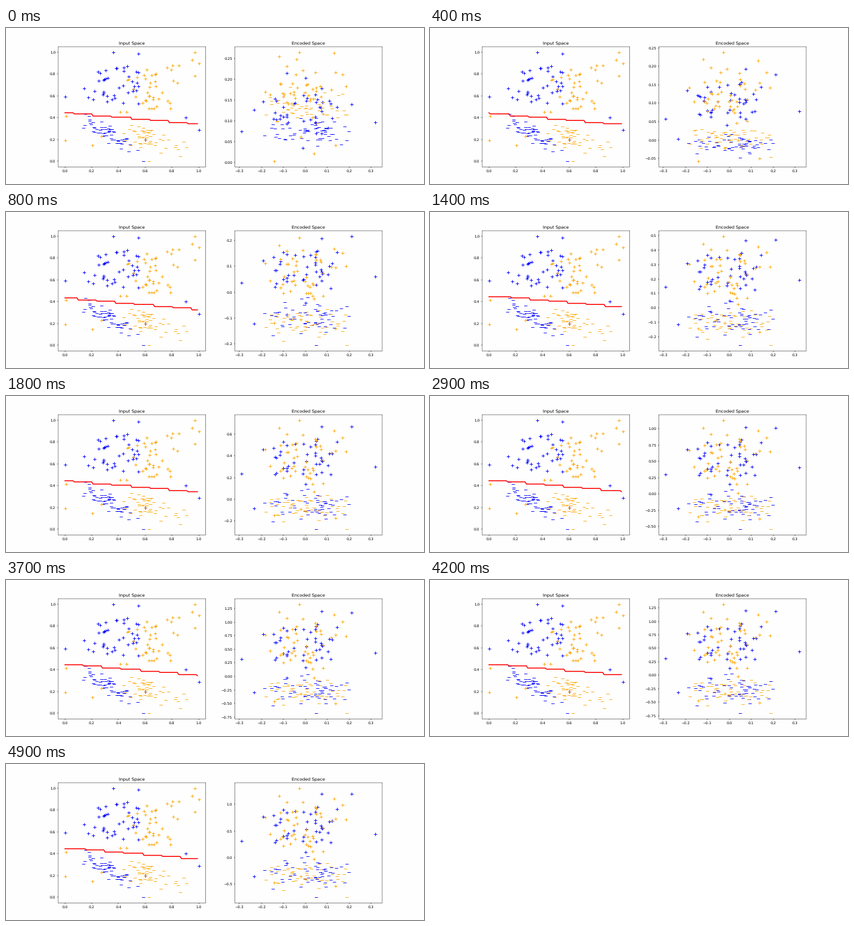
A matplotlib script for the animation above (5000 ms loop, 600 by 225 pixels).

```python
import numpy as np
import matplotlib.pyplot as plt
from matplotlib.animation import FuncAnimation

FRAMES, INTERVAL = 50, 100
PAPER = "#fefefe"
rng = np.random.default_rng(12)
plt.rcParams.update({"text.hinting": "none", "path.snap": False,
                     "figure.facecolor": PAPER, "axes.facecolor": PAPER})


def cluster(count, x_range, y_range, slope=0, outliers=()):
    """Samples (x, y, hidden z): bounded random cloud plus fixed outliers."""
    x = rng.triangular(*x_range, count)
    y = rng.triangular(*y_range, count) + slope * x
    z = rng.triangular(-.22, 0, .22, count)
    return np.vstack([np.column_stack([x, y, z]), *outliers])


GROUPS = [
    (cluster(38, (.12, .42, .62), (.44, .62, .95), outliers=[
        (0, .59, -.01), (.36, 1, .21), (.55, .985, .073), (1, .29, -.085),
        (.9, .4, 0), (.6, .2, -.235), (.21, .57, -.29), (.29, .625, .32)]),
     "blue", "+"),
    (cluster(59, (.12, .36, .56), (.37, .46, .55), slope=-.65, outliers=[
        (.585, .002, .05)]),
     "blue", "_"),
    (cluster(40, (.4, .66, .9), (.36, .6, .97), outliers=[
        (0, .193, -.143), (.007, .418, .038), (.207, .146, .138),
        (.275, .228, -.02), (.97, 1, -.027), (1, .898, .13),
        (.949, .93, -.12), (.97, .784, -.04)]),
     "orange", "+"),
    (cluster(51, (.4, .6, .96), (.22, .35, .48), slope=-.22, outliers=[
        (.626, 0, .19)]),
     "orange", "_"),
]

# Key points of the training path: encoded y = bias + wx * x + wy * y
KEY_FRAMES = [0, 8, 14, 18, 29, 37, 49]
BIAS = [-.013, -.199, -.284, -.342, -.658, -.83, -.856]
WX = [.205, -.01, .039, .1, .187, .25, .18]
WY = [.08, .419, .742, .977, 1.611, 1.915, 1.985]
START = [.444, .432, .454, .444, .451, .4515, .4535]  # boundary height at x = 0

GRID = np.arange(100) / 100


def boundary_steps(start):
    """Sloping boundary snapped to levels whose drops alternate .01 and .02."""
    line = start - .106 * GRID
    step = np.maximum(np.floor((.452 - line) / .015), 0)
    return .445 - .01 * (3 * step // 2)


fig, (left, right) = plt.subplots(1, 2, figsize=(16, 6), dpi=37.5)
left.set_title("Input Space")
right.set_title("Encoded Space")
left.set(xlim=(-.05, 1.05), ylim=(-.05, 1.05))
right.set_xlim(-.3205, .3505)

clouds = []
for points, color, marker in GROUPS:
    x, y, z = points.T
    style = dict(c=color, marker=marker, s=80)
    left.scatter(x, y, **style)
    clouds.append(right.scatter(z, y, **style))
boundary, = left.plot([], [], color="red", lw=2.6)


def update(i):
    bias, wx, wy, start = (np.interp(i, KEY_FRAMES, keys)
                           for keys in (BIAS, WX, WY, START))
    boundary.set_data(GRID, boundary_steps(start))

    low, high = np.inf, -np.inf
    for (points, _, _), cloud in zip(GROUPS, clouds):
        x, y, z = points.T
        encoded = bias + wx * x + wy * y
        cloud.set_offsets(np.column_stack([z, encoded]))
        low, high = min(low, encoded.min()), max(high, encoded.max())
    margin = .05 * (high - low)
    right.set_ylim(low - margin, high + margin)
    return [boundary, *clouds]


anim = FuncAnimation(fig, update, frames=FRAMES, interval=INTERVAL,
                     repeat=True, repeat_delay=0, blit=False)
plt.show()
```
